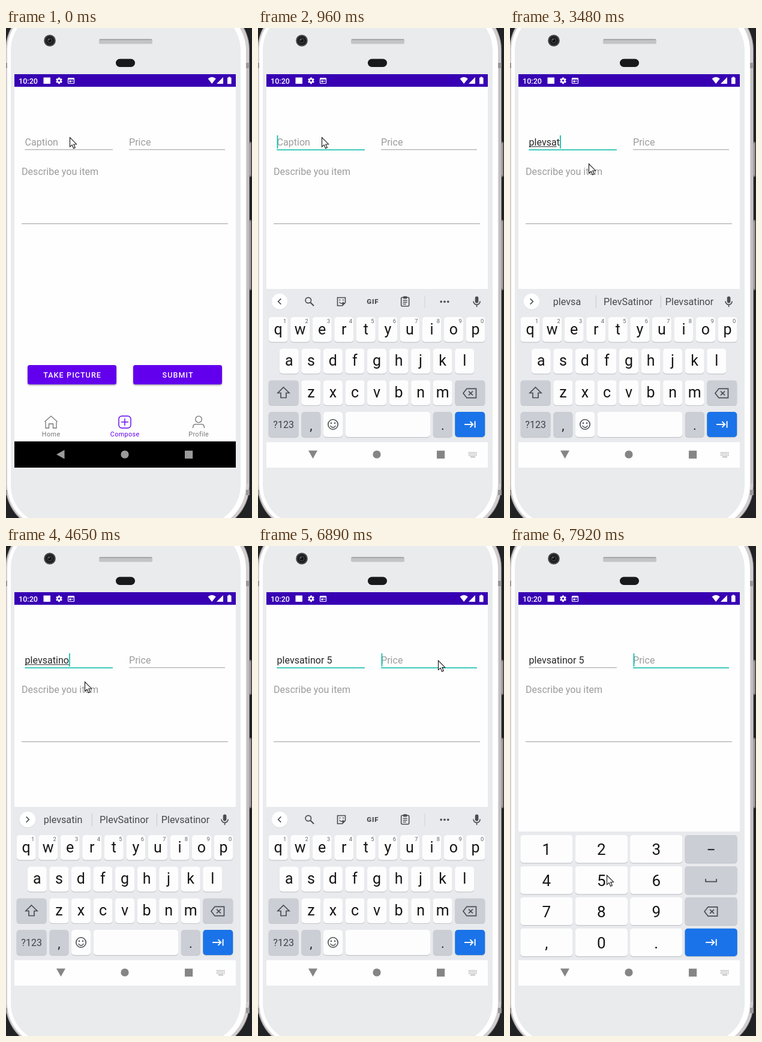
These frames come from a looping animation (410 px wide and 817 px high, 8000 ms). An HTML page with a canvas:

```html
<!DOCTYPE html>
<html lang="en">
<head>
<meta charset="utf-8">
<title>Compose screen</title>
<style>
html, body { margin: 0; width: 100%; height: 100%; overflow: hidden; background: #202224; }
canvas { display: block; width: 410px; height: 817px; }
</style>
</head>
<body>
<canvas id="stage" width="410" height="817"></canvas>
<script>
const W = 410, H = 817, LOOP = 8000;
const stage = document.getElementById('stage').getContext('2d');
const layer = document.createElement('canvas');
layer.width = W;
layer.height = H;
const kb = layer.getContext('2d');
let c = stage;

const FONT = 'Roboto, "Noto Sans", sans-serif';
const TEAL = '#14bfae', PURPLE = '#6200ee', GREY = '#757575', ICON = '#4a4d51';
const WORD = 'plevsatinor';
const NAMES = ['PlevSatinor', 'Plevsatinor'];

// ---- helpers ----
function rect(x, y, w, h, fill) {
  c.fillStyle = fill;
  c.fillRect(x, y, w, h);
}
function box(x, y, w, h, r, fill, stroke, lw = 1.4) {
  c.beginPath();
  c.roundRect(x, y, w, h, r);
  paint(fill, stroke, lw);
}
function disc(x, y, r, fill, stroke, lw = 1.4) {
  c.beginPath();
  c.arc(x, y, r, 0, 7);
  paint(fill, stroke, lw);
}
function poly(points, fill, stroke, lw = 1.4, open) {
  c.beginPath();
  points.forEach(([x, y]) => c.lineTo(x, y));
  if (!open) c.closePath();
  paint(fill, stroke, lw);
}
function line(points, stroke, lw) {
  poly(points, null, stroke, lw, true);
}
function paint(fill, stroke, lw) {
  if (fill) { c.fillStyle = fill; c.fill(); }
  if (stroke) { c.strokeStyle = stroke; c.lineWidth = lw; c.stroke(); }
}
function text(s, x, y, size, fill, align = 'left', weight = 400, gap = 0) {
  c.font = `${weight} ${size}px ${FONT}`;
  c.letterSpacing = gap + 'px';
  c.textAlign = align;
  c.fillStyle = fill;
  c.fillText(s, x, y);
  const w = c.measureText(s).width;
  c.letterSpacing = '0px';
  return w;
}
function at(x, y, draw) {
  c.save();
  c.translate(x, y);
  draw();
  c.restore();
}

// ---- phone ----
function phone() {
  rect(0, 0, W, H, '#202224');
  for (const [y, h] of [[190, 58], [320, 117]]) {
    box(402, y, 7, h, 2, '#8f8b8c', '#5d595a', 1);
    rect(406, y + 3, 1, h - 6, '#c4c0c1');
  }
  box(-1, -39, 407, 877, 75, '#8d898a');
  box(0, -38, 405, 875, 74, '#d2cecf');
  rect(402.5, 60, 1, 700, '#aaa6a7');
  for (const y of [58, 770]) {
    rect(400, y, 6, 9, '#9b9798');
    rect(0, y, 2, 9, '#9b9798');
  }
  box(2, -35, 398, 869, 72, '#ffffff');
  box(8, -29, 383, 857, 66, '#e9ebed');

  disc(73, 21, 9.8, '#45474a');
  disc(73, 21, 7.6, '#1c1d1f');
  disc(73, 21, 4.6, '#34383c');
  disc(73, 21, 2.6, '#0d0e10');
  disc(71.5, 19.5, 1.1, '#85898d');
  box(155, 18.5, 89, 8, 2, '#c3c4c5');
  rect(156, 18.5, 87, 1.6, '#9d9e9f');
  box(183, 51.5, 32, 13.5, 6.7, '#18191b');
}

function statusBar() {
  rect(14, 77, 369, 21, '#3700b3');
  text('10:20', 21, 92.5, 12.6, '#fff', 'left', 500);
  rect(62.5, 82.5, 11.5, 10.5, '#fff');
  at(88.5, 87.8, () => {
    c.beginPath();
    for (let i = 0; i < 6; i++) {
      const a = i * Math.PI / 3 + Math.PI / 6;
      c.moveTo(0, 0);
      c.lineTo(5.4 * Math.cos(a), 5.4 * Math.sin(a));
    }
    paint(null, '#fff', 2.8);
    disc(0, 0, 3, '#fff', '#fff', 2);
    disc(0, 0, 1.7, '#3700b3');
  });
  box(103.5, 83.5, 10, 9, 1, null, '#fff', 1.2);
  rect(103.5, 83.5, 10, 2.4, '#fff');
  rect(105.5, 87.5, 3.2, 3, '#fff');
  rect(109.5, 88, 2.4, 1, '#fff');
  c.beginPath();
  c.moveTo(343.2, 93);
  c.lineTo(336.6, 84.4);
  c.quadraticCurveTo(343.2, 79.2, 349.8, 84.4);
  paint('#fff');
  poly([[351, 93], [362, 93], [362, 82]], '#fff');
  rect(369, 82.7, 6.6, 10.6, '#fff');
  rect(370.8, 81.4, 3, 2, '#fff');
}

// ---- app ----
function caret(x) {
  rect(x, 179, 1.8, 22, TEAL);
}
function underline(x, w, on) {
  on ? rect(x, 202.4, w, 1.6, TEAL) : rect(x, 202.3, w, 1, '#9a9a9a');
}
function button(x, label) {
  c.save();
  c.shadowColor = 'rgba(0,0,0,.35)';
  c.shadowBlur = 3;
  c.shadowOffsetY = 1.5;
  box(x, 562, 148, 32.3, 3.5, PURPLE);
  c.restore();
  text(label, x + 74.6, 583, 12.5, '#fff', 'center', 500, 1.12);
}
function tab(x, label, color, icon) {
  at(x, 657, () => icon(color));
  text(label, x + 0.2, 680.8, 10.8, color, 'center', 400, 0.4);
}
function app(s) {
  rect(14, 98, 369, 592, '#fefefe');
  if (s.text) {
    const w = text(s.text, 31.5, 196, 16.1, '#262626');
    if (s.mark) {
      c.font = `400 16.1px ${FONT}`;
      rect(31.5, 197.3, c.measureText(s.text.slice(0, s.mark)).width, 1, '#262626');
    }
    if (s.caret && s.focus === 1) caret(31.5 + w);
  } else {
    text('Caption', 31.5, 196, 16.1, '#9c9c9c');
    if (s.caret && s.focus === 1) caret(31.6);
  }
  text('Price', 205, 196, 16.1, '#9c9c9c');
  if (s.caret && s.focus === 2) caret(205.5);
  text('Describe you item', 26, 244.5, 16.1, '#9c9c9c');
  underline(31.3, 146.7, s.focus === 1 || s.fade);
  underline(205, 160, s.focus === 2);
  rect(26, 325.8, 344, 1, '#9a9a9a');

  button(36, 'TAKE PICTURE');
  button(212, 'SUBMIT');
  tab(75, 'Home', GREY, col => poly([[-10, -1], [0, -10], [10, -1], [9, 0.5], [9, 10], [3.5, 10],
    [3.5, 3], [-3.5, 3], [-3.5, 10], [-9, 10], [-9, 0.5]], null, col, 1.3));
  tab(198, 'Compose', PURPLE, col => {
    box(-10, -10, 20, 20, 5, null, col, 1.4);
    line([[-6, 0], [6, 0]], col, 1.4);
    line([[0, -6], [0, 6]], col, 1.4);
  });
  tab(321, 'Profile', GREY, col => {
    disc(0, -4.5, 5.3, null, col, 1.3);
    c.beginPath();
    c.moveTo(-9.5, 10);
    c.bezierCurveTo(-9.5, 1.5, -4, 3.8, 0, 3.8);
    c.bezierCurveTo(4, 3.8, 9.5, 1.5, 9.5, 10);
    paint(null, col, 1.3);
  });
}

function navBar(open, hint) {
  const col = open ? '#858585' : '#9b9b9b';
  poly(open ? [[84, 704.5], [99, 704.5], [91.5, 718]] : [[97.5, 703.5], [97.5, 718.5], [84, 711]], col);
  disc(198, 711, 6.6, col);
  rect(298, 704.7, 13.2, 13.2, col);
  if (!hint) return;
  for (let r = 0; r < 3; r++)
    for (let i = 0; i < 6; i++) rect(351 + i * 2.4, 707 + r * 2.5, 1.4, 1.4, '#a2a2a2');
  rect(354, 714.6, 8, 1.3, '#a2a2a2');
}

// ---- keyboard ----
function key(x, y, w, h, fill = '#fdfdfe') {
  box(x, y + 1.2, w, h, 5, '#c3c6ca');
  box(x, y, w, h, 5, fill);
}
function backspace(x, y) {
  at(x, y, () => {
    poly([[-11, 0], [-5, -7.7], [10.5, -7.7], [10.5, 7.7], [-5, 7.7]], null, ICON, 1.7);
    line([[-2, -3.4], [5, 3.4]], ICON, 1.7);
    line([[5, -3.4], [-2, 3.4]], ICON, 1.7);
  });
}
function nextIcon(x, y) {
  at(x, y, () => {
    line([[-9, 0], [5, 0]], '#fff', 1.9);
    line([[0.5, -4.8], [5.3, 0], [0.5, 4.8]], '#fff', 1.9);
    line([[8.6, -5.5], [8.6, 5.5]], '#fff', 1.9);
  });
}
function toolbar(words) {
  const d = words ? 1 : -1;
  disc(36, 457, 13.2, '#d7d9dc');
  disc(36, 456, 13.2, '#fff');
  line([[36 - 2.3 * d, 451.4], [36 + 2.3 * d, 456], [36 - 2.3 * d, 460.6]], ICON, 1.7);
  box(361.8, 447.5, 5.6, 11, 2.8, ICON);
  c.beginPath();
  c.arc(364.6, 455.6, 5.6, 0, Math.PI);
  paint(null, ICON, 1.6);
  rect(363.8, 461, 1.6, 4.2, ICON);
  if (words) {
    words.forEach((w, i) => text(w, 95 + i * 102, 462.4, 16.2, '#45484c', 'center'));
    rect(142.7, 446, 1, 21, '#c3c6ca');
    rect(250.8, 446, 1, 21, '#c3c6ca');
    return;
  }
  disc(83.8, 454, 4.7, null, ICON, 1.7);
  line([[87.2, 457.5], [93, 463.3]], ICON, 2);
  poly([[132.5, 449.5], [145.5, 449.5], [145.5, 458], [140.5, 463], [132.5, 463]], null, ICON, 1.6);
  poly([[140.5, 463], [140.5, 458], [145.5, 458]], ICON);
  rect(135.5, 452.5, 1.7, 1.9, ICON);
  rect(141, 452.5, 1.7, 1.9, ICON);
  c.beginPath();
  c.arc(139, 456, 3.2, 0.2, Math.PI - 0.2);
  paint(null, ICON, 1.3);
  text('GIF', 191.4, 460.2, 11.5, ICON, 'center', 900, 0.9);
  box(238.7, 449.2, 13, 14.5, 1.5, null, ICON, 1.6);
  box(242, 447.2, 6.4, 4.4, 1, ICON);
  for (const [y, w] of [[453.6, 7], [456.6, 7], [459.6, 5]]) rect(241.7, y, w, 1.4, ICON);
  rect(277.5, 446, 1, 21, '#d0d3d6');
  for (let i = -1; i < 2; i++) disc(311 + i * 5.8, 456.4, 1.8, ICON);
}
function qwerty(words) {
  const step = 36.55, dark = '#cbced5';
  rect(14, 435, 369, 380, '#e8eaed');
  toolbar(words);
  ['qwertyuiop', 'asdfghjkl', 'zxcvbnm'].forEach((row, r) => {
    const x0 = [33.6, 51.8, 88.4][r], y = 482 + r * 52.7;
    [...row].forEach((ch, i) => {
      const x = x0 + i * step;
      key(x - 16, y, 32, 41.5);
      text(ch, x, y + 28.6, 25, '#151515', 'center');
      if (!r) text(String((i + 1) % 10), x + 11, y + 10.3, 9.3, '#5f6368', 'center');
    });
  });
  key(17.6, 587.4, 50, 41.5, dark);
  poly([[42.5, 599], [52, 608.5], [47, 608.5], [47, 616.5], [38, 616.5], [38, 608.5], [33, 608.5]], null, ICON, 1.7);
  key(328.3, 587.4, 50, 41.5, dark);
  backspace(353, 609);

  key(17.6, 640, 50, 42, dark);
  text('?123', 42.6, 667, 16, '#3f4246', 'center');
  key(72.4, 640, 32, 42, dark);
  text(',', 88.4, 670, 22, '#222', 'center');
  key(109, 640, 32, 42);
  at(125, 661, () => {
    disc(0, 0, 8.2, null, ICON, 1.6);
    disc(-3, -2.3, 1.3, ICON);
    disc(3, -2.3, 1.3, ICON);
    c.beginPath();
    c.arc(0, 0.6, 4.4, 0.3, Math.PI - 0.3);
    paint(null, ICON, 1.5);
  });
  key(145.6, 640, 141.5, 42);
  key(291.8, 640, 32, 42, dark);
  text('.', 307.8, 669.5, 22, '#222', 'center');
  key(328.3, 640, 50, 42, '#1a73e8');
  nextIcon(353, 661);
}
function numpad() {
  rect(14, 476, 369, 339, '#e8eaed');
  ['123-', '456_', '789<', ',0.>'].forEach((row, r) => [...row].forEach((ch, i) => {
    const x = 17.3 + i * 91.4, y = 482 + r * 51.9, mx = x + 43.6, my = y + 23.2;
    key(x, y, 87.3, 46.3, i < 3 ? '#fdfdfe' : r < 3 ? '#cbced5' : '#1a73e8');
    if (i < 3) text(ch, mx, my + 10, 26, '#151515', 'center');
    else if (r === 0) rect(mx - 5.5, my, 11, 2, '#222');
    else if (r === 1) line([[mx - 9, my - 2], [mx - 9, my + 2.6], [mx + 9, my + 2.6], [mx + 9, my - 2]], ICON, 1.8);
    else if (r === 2) backspace(mx, my + 0.5);
    else nextIcon(mx, my);
  }));
}
function keyboard(s) {
  if (!s.pad) return;
  c = kb;
  c.clearRect(0, 0, W, H);
  s.pad === 2 ? numpad() : qwerty(s.words);
  c = stage;
  c.save();
  c.beginPath();
  c.rect(14, 98, 369, 635);
  c.clip();
  c.globalAlpha = s.alpha;
  c.drawImage(layer, 0, s.drop);
  c.restore();
}

function pointer(x, y) {
  at(x, y, () => poly([[0, 0], [0, 15.6], [3.6, 12.4], [6.1, 18.2], [8.8, 17], [6.3, 11.4], [11, 11.2]],
    '#fff', '#111', 1.1));
}

// ---- timeline: each entry changes the state from its time on ----
const start = { text: '', mark: 0, caret: 0, focus: 0, fade: 0, pad: 0, alpha: 1, drop: 0, words: null, mouse: [106.5, 182.5] };
const typed = (n, mark = n) => ({ text: WORD.slice(0, n), mark, caret: 1 });
const hints = n => [WORD.slice(0, n), ...NAMES];
const events = [
  [690, { focus: 1, caret: 1 }],
  [810, { pad: 1, alpha: 0.52, drop: 126 }],
  [960, { alpha: 1, drop: 0 }],
  [1110, { mouse: [114, 196] }],
  [1260, { mouse: [128, 219], caret: 0 }],
  [1410, { mouse: [131.5, 226.5] }],
  [1710, { caret: 1 }],
  [2150, typed(1)],
  [2300, { ...typed(2), words: ['p', 'please', 'pic'] }],
  [2450, { words: ['pl', 'please', 'place'] }],
  [2600, { ...typed(3), words: ['ple', 'please', 'plenty'] }],
  [2900, typed(4)],
  [3030, { words: ['plev', 'please', 'pleased'] }],
  [3330, typed(5)],
  [3480, { ...typed(7, 6), words: hints(6) }],
  [3630, { ...typed(8, 7), words: hints(7) }],
  [3780, { mark: 8, words: hints(8) }],
  [4220, typed(9)],
  [4370, { words: hints(9) }],
  [4650, typed(10)],
  [4800, { ...typed(11), words: hints(11) }],
  [4950, { text: WORD + ' ', mark: 0, words: ['4', 'and', 'is'] }],
  [5100, { text: WORD + ' 4' }],
  [5420, { words: null }],
  [5570, { caret: 0 }],
  [6030, { caret: 1 }],
  [6180, { text: WORD + ' ' }],
  [6310, { text: WORD + ' 5' }],
  [6460, { mouse: [178, 218] }],
  [6610, { mouse: [262, 199] }],
  [6740, { mouse: [300.5, 191] }],
  [6890, { focus: 2, fade: 1 }],
  [7040, { fade: 0, pad: 2, mouse: [288, 222] }],
  [7160, { mouse: [240, 320] }],
  [7310, { mouse: [158, 450] }],
  [7460, { mouse: [97, 525], caret: 0 }],
  [7610, { mouse: [118, 540] }],
  [7770, { mouse: [152, 548] }],
  [7920, { mouse: [161.5, 549], caret: 1 }]
];

function draw(t) {
  const s = { ...start };
  for (const [when, change] of events) if (when <= t) Object.assign(s, change);
  const open = s.pad && s.alpha === 1;
  phone();
  statusBar();
  app(s);
  rect(14, 689.3, 369, 43.7, '#000');
  keyboard(s);
  if (open) rect(14, 690.5, 369, 42.5, '#fefefe');
  navBar(open, s.pad);
  pointer(...s.mouse);
}

const t0 = performance.now();
function tick() {
  draw((performance.now() - t0) % LOOP);
  requestAnimationFrame(tick);
}
tick();
</script>
</body>
</html>
```
